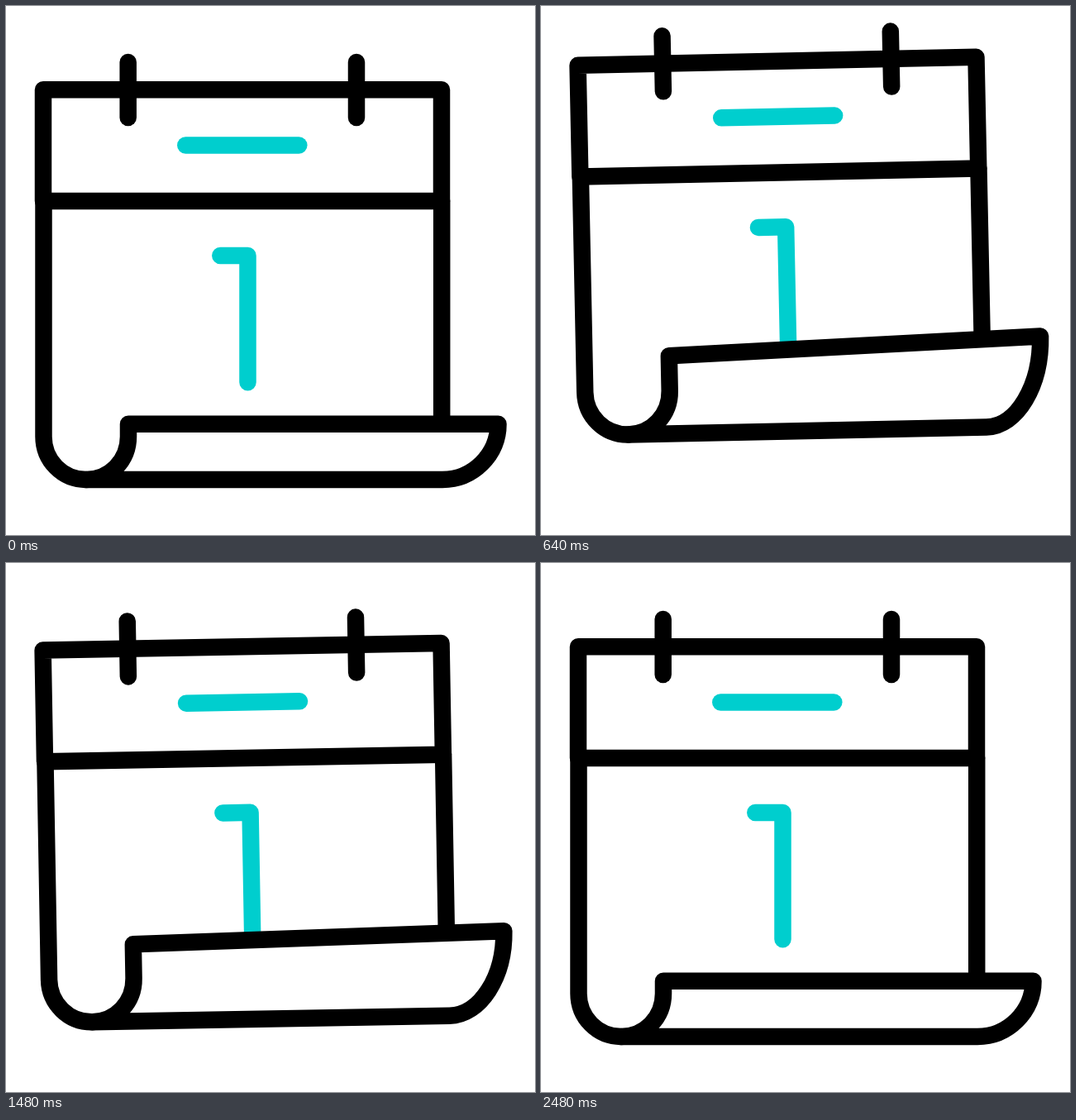
An HTML page with a canvas for the animation above (2880 ms loop, 640 by 640 pixels).

```html
<!DOCTYPE html>
<html lang="en">
<head>
<meta charset="utf-8">
<title>Calendar</title>
<style>
  html, body { margin: 0; width: 100%; height: 100%; overflow: hidden; background: #fff; }
  canvas { display: block; }
</style>
</head>
<body>
<canvas id="stage" width="640" height="640"></canvas>
<script>
const ctx = document.getElementById('stage').getContext('2d');
const LOOP = 2880, STEP = 40, STROKE = 20.5;
const BLACK = '#000', CYAN = '#00cece';
const FIRST_FLAP = 840, LAST_FLAP = 2080, FLAP_PERIOD = 620;

const clamp = p => Math.min(1, Math.max(0, p));
const progress = (t, from, to) => clamp((t - from) / (to - from));
const smooth = p => p * p * (3 - 2 * p);
const rise = (t, from, to) => smooth(progress(t, from, to));

// Eases from zero through [time, value] turning points.
const swing = turns => t => {
  let value = 0, from = 0, last = 0;
  for (const [to, target] of turns) {
    value += (target - last) * rise(t, from, to);
    [from, last] = [to, target];
  }
  return value;
};

const tilt = swing([[480, -4], [880, 4], [1240, -2], [1720, 0]]);
const lift = swing([[240, 36], [700, -38], [1030, 17], [1420, 0]]);

// The paper end flaps three times: 1 is fully raised, 0 is lowered.
function flap(t, start) {
  if (t < FIRST_FLAP) return rise(t, start, FIRST_FLAP);
  const end = LAST_FLAP + FLAP_PERIOD / 2;
  return (1 + Math.cos(2 * Math.PI * (Math.min(t, end) - FIRST_FLAP) / FLAP_PERIOD)) / 2;
}

function curlShape(t) {
  const n = Math.max(0, (t - FIRST_FLAP) / FLAP_PERIOD);
  const raised = flap(t, 240), opened = flap(t, 40);
  const droop = t < LAST_FLAP ? 11 * rise(t, 0, 240) * (1 - raised) : 0;
  const sag = 0.6 ** n * (droop - 36 * raised);
  const skew = Math.max(0, 17 - 8.5 * n) * opened;
  const bottom = 573 + sag;
  const left = 505.8 + sag - 32 * 0.83 ** (n * n) * opened;
  return { bottom, left, right: left - skew, reach: skew * 0.15 };
}

function line(points, color = BLACK, width = STROKE) {
  ctx.beginPath();
  points.forEach(([x, y]) => ctx.lineTo(x, y));
  ctx.strokeStyle = color;
  ctx.lineWidth = width;
  ctx.stroke();
}

// Cyan polyline with a black stroke running along it from the given time.
function sweptLine(points, t, start) {
  line(points, CYAN);
  const head = progress(t, start, start + 400);
  const tail = progress(t, start + 220, start + 670);
  if (head <= tail) return;
  const total = points.slice(1).reduce(
    (sum, [x, y], i) => sum + Math.hypot(x - points[i][0], y - points[i][1]), 0);
  ctx.setLineDash([(head - tail) * total, 2 * total]);
  ctx.lineDashOffset = -tail * total;
  line(points, BLACK, 23);
  ctx.setLineDash([]);
}

function drawCurl(t) {
  const { bottom, left, right, reach } = curlShape(t);
  const bend = bottom - 52, tip = 595.5 + reach;

  line([[527.2, 236], [527.2, right + 5]]);

  ctx.beginPath();
  ctx.moveTo(148, left);
  ctx.lineTo(tip, right);
  ctx.bezierCurveTo(tip, right + (bottom - right) * 0.55, 565 + reach, bottom, 528 + reach, bottom);
  ctx.lineTo(97, bottom);
  ctx.bezierCurveTo(125.5, bottom, 148, bottom - 23, 148, bend);
  ctx.closePath();
  ctx.fillStyle = '#fff';
  ctx.fill();
  ctx.stroke();

  ctx.beginPath();
  ctx.moveTo(45.5, 236);
  ctx.lineTo(45.5, bend);
  ctx.bezierCurveTo(45.5, bottom - 23, 68.5, bottom, 97, bottom);
  ctx.stroke();
}

function draw(t) {
  ctx.setTransform(1, 0, 0, 1, 0, 0);
  ctx.fillStyle = '#fff';
  ctx.fillRect(0, 0, 640, 640);
  ctx.lineCap = ctx.lineJoin = 'round';

  ctx.translate(286, 125 + lift(t));
  ctx.rotate(tilt(t) * Math.PI / 180);
  ctx.translate(-286, -125);

  sweptLine([[259.3, 302], [292.5, 302], [292.5, 455.3]], t, 1640);
  drawCurl(t);
  line([[45, 236], [45, 101.3], [527, 101.3], [527, 236], [45, 236]]);
  for (const x of [147.7, 424]) line([[x, 68], [x, 135]]);
  sweptLine([[217.3, 168.5], [354.3, 168.5]], t, 748);
}

const start = performance.now();
function tick() {
  const t = (performance.now() - start) % LOOP;
  draw(Math.floor(t / STEP) * STEP);
  requestAnimationFrame(tick);
}
tick();
</script>
</body>
</html>
```
